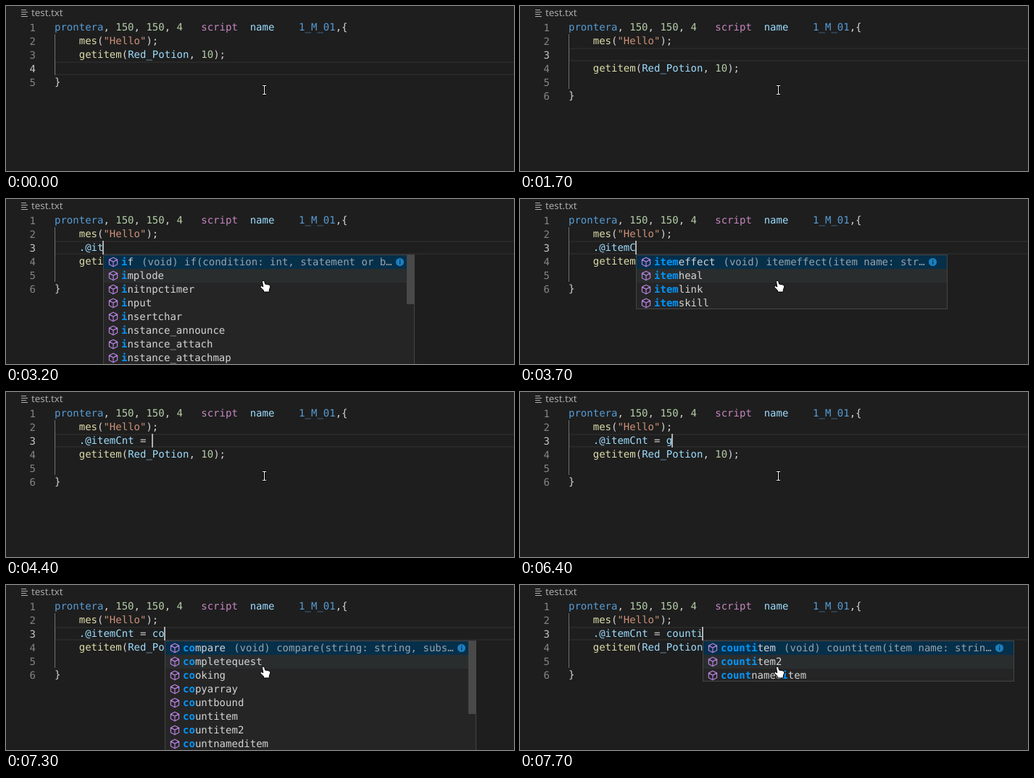
Recreate the animation shown at these times as an HTML page. Size 701 by 229 pixels, loop 8000 ms.

```html
<!DOCTYPE html>
<html>
<head>
<meta charset="utf-8">
<style>
html, body { margin: 0; width: 100%; height: 100%; overflow: hidden; background: #1e1e1e; }
svg { display: block; }
text { font: 14px "DejaVu Sans Mono", monospace; white-space: pre; text-rendering: geometricPrecision; }
.ui { font: 13.3px "Noto Sans", sans-serif; }
.hit { fill: #0097fb; font-weight: bold; }
</style>
</head>
<body>
<svg id="stage" width="701" height="229" viewBox="0 0 701 229"></svg>
<script>
const LOOP = 8000, W = 8.428, LEFT = 67, LINE = 19, TOP = 20, POP_W = 430;
const FG = '#d4d4d4', BLUE = '#569cd6', VAR = '#9cdcfe', NUM = '#b5cea8', FN = '#dcdcaa';

// Each list: names, signature of the first one, scrollbar thumb height
const lists = {
  i: ['if implode initnpctimer input insertchar instance_announce instance_attach instance_attachmap',
    'if(condition: int, statement or block)', 68],
  it: ['itemeffect itemheal itemlink itemskill initnpctimer input insertchar instance_announce',
    'itemeffect(item name: string, amount: int)', 101],
  item: ['itemeffect itemheal itemlink itemskill', 'itemeffect(item name: string, amount: int)', 0],
  g: ['getarg getargcount getarraysize getattachedrid getbrokenid getcharid getd getelementofarray',
    'getarg(index: int, default value: string)', 34],
  c: ['callfunc callshop callsub cardscnt ceil changebase changecharsex charat',
    'callfunc(function: string, argument: string)', 52],
  co: ['compare completequest cooking copyarray countbound countitem countitem2 countnameditem',
    'compare(string: string, substring: string)', 101],
  cou: ['countbound countitem countitem2 countnameditem completequest',
    'countbound(item name: string, type: int)', 0],
  count: ['countbound countitem countitem2 countnameditem', 'countbound(item name: string, type: int)', 0],
  counti: ['countitem countitem2 countnameditem', 'countitem(item name: string)', 0]
};

// time, active line, typed text (null: line not inserted), caret, list, query, 1 list / 2 + signature / 3 + hand
const VARNAME = '.@itemCnt', EQ = VARNAME + ' = ';
const steps = [
  [0, 4, null, 0], [400, 4, null, 1], [900, 2, null, 1],
  [1100, 3, '', 1], [1700, 3, '', 0], [1900, 3, '.', 1], [2300, 3, '.@', 1],
  [2800, 3, '.@i', 1],
  [2900, 3, '.@i', 1, 'i', 'i', 1], [3000, 3, '.@i', 1, 'i', 'i', 2], [3100, 3, '.@i', 1, 'i', 'i', 3],
  [3200, 3, '.@it', 1, 'i', 'i', 3], [3300, 3, '.@ite', 1, 'it', 'it', 3],
  [3400, 3, '.@item', 1, 'it', 'it', 3], [3700, 3, '.@itemC', 1, 'item', 'item', 3],
  [4000, 3, '.@itemCn', 1], [4100, 3, VARNAME, 1], [4200, 3, VARNAME + ' ', 1],
  [4300, 3, VARNAME + ' =', 1], [4400, 3, EQ, 1], [4900, 3, EQ, 0], [5400, 3, EQ, 1], [5900, 3, EQ, 0],
  [6400, 3, EQ + 'g', 1], [6500, 3, EQ + 'g', 1, 'g', 'g', 1], [6600, 3, EQ + 'g', 1, 'g', 'g', 3],
  [6900, 3, EQ + 'g', 0, 'g', 'g', 3], [7100, 3, EQ, 1],
  [7200, 3, EQ + 'c', 1, 'c', 'c', 3], [7300, 3, EQ + 'co', 1, 'co', 'co', 3],
  [7400, 3, EQ + 'cou', 1, 'cou', 'cou', 3], [7500, 3, EQ + 'coun', 1, 'count', 'coun', 3],
  [7600, 3, EQ + 'count', 1, 'count', 'count', 3], [7700, 3, EQ + 'counti', 1, 'counti', 'counti', 3]
];

const colX = col => LEFT + col * W;
const lineY = n => TOP + (n - 1) * LINE;
const rect = (x, y, w, h, fill) => `<rect x="${x}" y="${y}" width="${w}" height="${h}" fill="${fill}"/>`;
const frame = (x, y, w, h, stroke, line) => `<rect x="${x + line / 2}" y="${y + line / 2}" width="${w - line}"
  height="${h - line}" fill="none" stroke="${stroke}" stroke-width="${line}"/>`;
const text = (x, y, s, fill, extra = '') => `<text x="${x}" y="${y}" fill="${fill}" ${extra}>${s}</text>`;

// Tokens are [column, text, colour]
const code = (n, tokens) =>
  tokens.map(([col, s, fill]) => text(colX(col), lineY(n) + 14, s, fill)).join('');

function typedTokens(s) {
  const [, name, op, rest] = s.match(/^(\.?@?\w*)([ =]*)(.*)$/);
  return [[4, name, name.length > 2 ? VAR : FG], [4 + name.length, op, FG],
    [4 + name.length + op.length, rest, VAR]];
}

function label(name, query) {
  let k = 0;
  return [...name].map(ch => ch === query[k] ? (k++, `<tspan class="hit">${ch}</tspan>`) : ch).join('');
}

const methodIcon = (x, y) => `<path transform="translate(${x} ${y})" fill="none" stroke="#b180d7" stroke-width="1.2"
  stroke-linejoin="round" d="M0 -6.3L5.6 -3.4V3.2L0 6.3L-5.6 3.2V-3.4ZM-5.6 -3.4L0 -.4L5.6 -3.4M0 -.4V6.3"/>`;

function popup(x, key, query, mode) {
  const [names, signature, thumb] = lists[key];
  const rows = names.split(' ');
  const left = Math.round(x), width = Math.round(x + POP_W) - left;
  const height = rows.length < 8 ? rows.length * LINE : 230;
  let out = rect(0, 0, width, height, '#252526');
  rows.forEach((name, i) => {
    const y = 1 + i * LINE;
    if (i === 0) out += rect(1, y, width - 2, LINE, '#062f4a');
    if (i === 1 && mode > 2) out += rect(1, y, width - 2, LINE, '#2a2d2e');
    out += methodIcon(14, y + 9.5) + text(25, y + 14, label(name, query), FG);
  });
  if (mode > 1) {
    const start = 25 + rows[0].length * W + 11.2;
    const room = Math.floor((POP_W - 31 - start) / W);
    let detail = '(void) ' + signature;
    if (detail.length > room) detail = detail.slice(0, room - 1) + '…';
    out += text(start, 15, detail, FG, 'opacity=".7"');
    out += `<circle cx="${width - 20.5}" cy="10.5" r="5.5" fill="#1b80c0"/>`
      + rect(width - 21, 7, 1.3, 1.5, '#062f4a') + rect(width - 21, 9.5, 1.3, 4, '#062f4a');
  }
  if (thumb) out += rect(width - 11, 1, 10, thumb, '#494949');
  out += frame(0, 0, width, height, '#454545', 1);
  return `<svg x="${left}" y="77" width="${width}" height="${height}" overflow="hidden">${out}</svg>`;
}

const beam = [['#000', 3], ['#fff', 1]].map(([stroke, line]) =>
  `<path fill="none" stroke="${stroke}" stroke-width="${line}" d="M354 110.5H359M356.5 110V123M354 122.5H359"/>`).join('');
const hand = `<path fill="#fff" stroke="#000" stroke-width="1" stroke-linejoin="round"
  d="M353.5 114.5Q355 112 356.7 114.2L357.6 118L362.5 119Q365.3 119.6 364.8 122L363.3 126V129H355.5V127L351.2 122.6Q350.3 120.3 352.8 120.6L354.8 122Z"/>`;

function draw([, active, typed, caret, key, query, mode]) {
  const added = typed !== null, extra = added ? 1 : 0, last = 5 + extra;
  let out = rect(0, 0, 701, 229, '#1e1e1e');
  for (let i = 0; i < 4; i++) out += rect(21, 5 + i * 3, i % 2 ? 9 : 7, 1, '#b0b0b0');
  out += text(35, 14, 'test.txt', '#a9a9a9', 'class="ui"');

  const y = lineY(active);
  out += frame(LEFT, y, 640, LINE, '#282828', 2);
  out += rect(LEFT, lineY(2), 1, (last - 2) * LINE, '#707070');
  for (let n = 1; n <= last; n++)
    out += text(32.6, lineY(n) + 15, n, n === active ? '#c6c6c6' : '#858585');

  out += code(1, [[0, 'prontera', BLUE], [8, ',', FG], [10, '150', NUM], [13, ',', FG], [15, '150', NUM],
    [18, ',', FG], [20, '4', NUM], [24, 'script', '#c586c0'], [32, 'name', VAR], [40, '1_M_01', BLUE], [46, ',{', FG]]);
  out += code(2, [[4, 'mes', FN], [7, '(', FG], [8, '"Hello"', '#ce9178'], [15, ');', FG]]);
  if (added) out += code(3, typedTokens(typed));
  out += code(3 + extra, [[4, 'getitem', FN], [11, '(', FG], [12, 'Red_Potion', VAR], [22, ',', FG],
    [24, '10', NUM], [26, ');', FG]]);
  out += code(last, [[0, '}', FG]]);

  const x = colX(active === 2 ? 17 : 4 + (typed || '').length);
  if (caret) out += rect(Math.round(x - 1), y, 2, LINE, '#aeafad');
  if (key) out += popup(x, key, query, mode);
  stage.innerHTML = out + (mode > 2 ? hand : beam);
}

const stage = document.getElementById('stage');
let shown;
function tick(now) {
  const t = now % LOOP;
  const step = steps.findLast(s => s[0] <= t) || steps[0];
  if (step !== shown) draw(shown = step);
  requestAnimationFrame(tick);
}
tick(performance.now());
</script>
</body>
</html>
```
